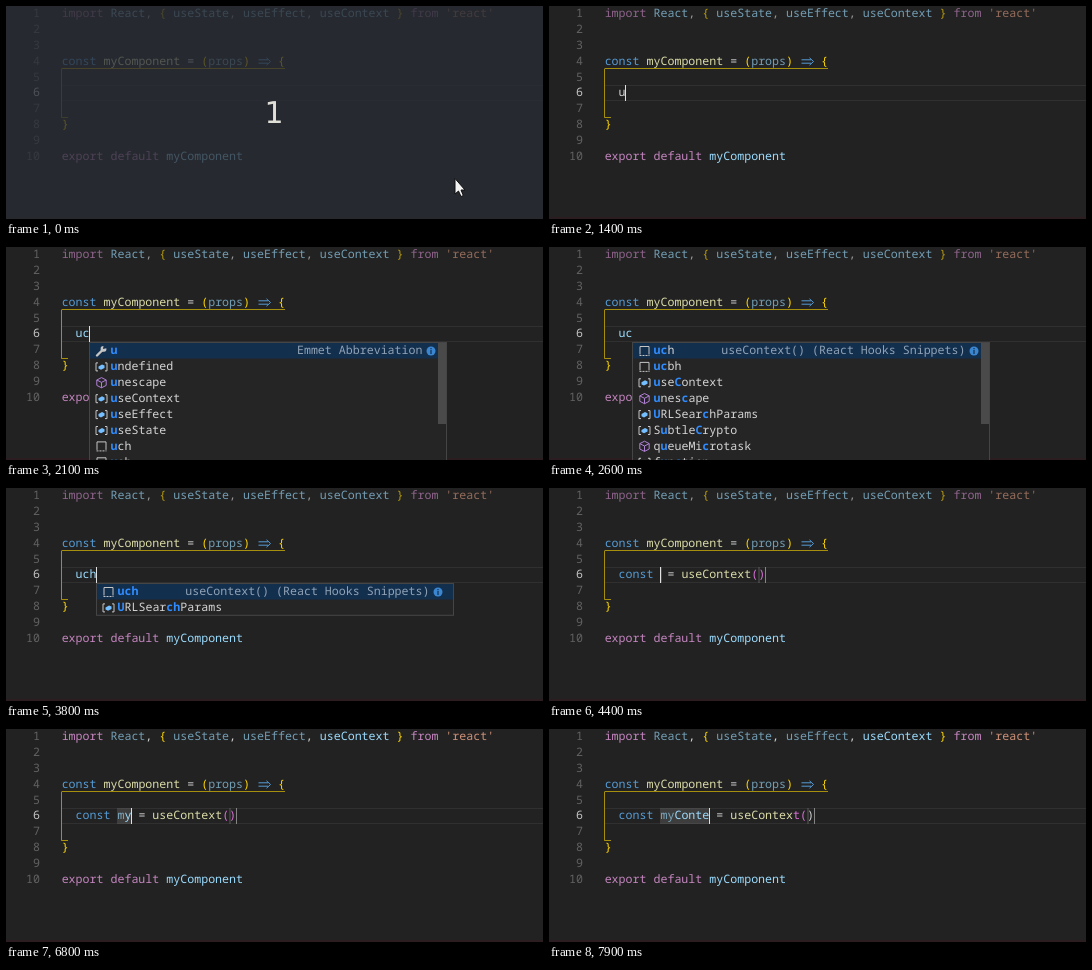
Write an HTML page that moves like this. It is 537 by 213 pixels and loops after 8 s.

```html
<!DOCTYPE html>
<html lang="en">
<head>
<meta charset="utf-8">
<title>Hook snippet</title>
<style>
html, body { margin: 0; width: 100%; height: 100%; overflow: hidden; background: #222; }
svg { display: block; }
text { font: 11.633px "Noto Sans Mono", "DejaVu Sans Mono", monospace; white-space: pre; text-rendering: geometricPrecision; }
.bold { font-weight: 700; }
.count { font: 30px "DejaVu Sans", sans-serif; }
</style>
</head>
<body>
<svg id="stage" width="537" height="213" viewBox="0 0 537 213"></svg>
<script>
const LOOP = 8000, STEP = 100;
const CHAR = 6.98, LEFT = 56.05, PITCH = 15.9, BASE = 10.9;
const C = {
  key: '#c586c0', blue: '#569cd6', name: '#9cdcfe', fn: '#dcdcaa', str: '#ce9178',
  text: '#d4d4d4', gold: '#ffd700', pink: '#da70d6', red: '#f14c4c', match: '#2f8cff'
};
const KEYS = [6200, 6800, 7300, 7500, 7600, 7700, 7900];
const CARET_ON = [[200, 700], [1200, 1900], [2100, 2600], [2800, 3300], [3800, 4700], [5200, 5700], [6200, LOOP]];

// Rows are [icon, label]; matched letters stand between asterisks.
const LIST_U = [
  ['wrench', '*u*'], ['value', '*u*ndefined'], ['cube', '*u*nescape'], ['value', '*u*seContext'],
  ['value', '*u*seEffect'], ['value', '*u*seState'], ['snippet', '*u*ch'], ['snippet', '*u*eh']
];
const LIST_UC = [
  ['snippet', '*uc*h'], ['snippet', '*uc*bh'], ['value', '*u*se*C*ontext'], ['cube', '*u*nes*c*ape'],
  ['value', '*U*RLSear*c*hParams'], ['value', 'S*u*btle*C*rypto'], ['cube', 'q*u*eueMi*c*rotask'], ['value', 'f*u*n*c*tion']
];
const LIST_UCH = [['snippet', '*uch*'], ['value', '*U*RLSear*ch*Params']];
const HOOK = 'useContext() (React Hooks Snippets)';

const ICONS = {
  wrench: '<path d="M1.5 10.5L6 6" stroke="#c5c5c5" stroke-width="2.4" stroke-linecap="round"/>' +
    '<path d="M10.8 3.2A2.9 2.9 0 1 1 8 1L7.5 4Z" fill="#c5c5c5"/>',
  value: '<path d="M2.5 2H.5V10H2.5M9.5 2H11.5V10H9.5" stroke="#c5c5c5" fill="none"/>' +
    '<path d="M3 5.5L6.5 3.5 9 4.7V7L5.5 8.8 3 7.6Z" fill="#75beff"/>',
  cube: '<path d="M6 .8L10.7 3.2V8.6L6 11 1.3 8.6V3.2ZM1.3 3.2L6 5.6 10.7 3.2M6 5.6V11" stroke="#b180d7" fill="none"/>',
  snippet: '<path d="M1.5 9.5V1.5H10.5V9.5" stroke="#c5c5c5" fill="none"/>' +
    '<path d="M1 10.5H11" stroke="#c5c5c5" stroke-dasharray="2 1"/>'
};

const stage = document.getElementById('stage');
const colX = n => LEFT + n * CHAR;
const snapX = n => Math.floor(colX(n));
const baseline = line => BASE + (line - 1) * PITCH;

const esc = s => s.replace(/&/g, '&amp;').replace(/</g, '&lt;');
const span = (color, s, dim) => `<tspan fill="${color}"${dim ? ' fill-opacity=".667"' : ''}>${esc(s)}</tspan>`;
const text = (x, y, body, attrs = '') => `<text x="${x}" y="${y}" ${attrs}>${body}</text>`;
const rect = (x, y, w, h, fill, attrs = '') => `<rect x="${x}" y="${y}" width="${w}" height="${h}" fill="${fill}" ${attrs}/>`;
const code = (line, ...spans) => text(LEFT - .4, baseline(line), spans.join(''));

function gutter() {
  let out = '';
  for (let n = 1; n <= 10; n++)
    out += text(34, baseline(n), n, `text-anchor="end" fill="${n === 6 ? '#c6c6c6' : '#626262'}"`);
  return out;
}

function importLine(used) {
  const dim = !used;
  return code(1,
    span(C.key, 'import ', dim), span(C.name, 'React', true), span(C.text, ', ', dim),
    span(C.gold, '{ ', dim), span(C.name, 'useState', true), span(C.text, ', ', dim),
    span(C.name, 'useEffect', true), span(C.text, ', ', dim), span(C.name, 'useContext', dim),
    span(C.gold, ' }', dim), span(C.key, ' from ', dim), span(C.str, "'react'", dim));
}

function frameCode(t) {
  const guide = t < 1400 ? .45 : .6;
  return rect(56, 79, 481, 1, '#303030') + rect(56, 94, 481, 1, '#303030') +
    rect(0, 211, 537, 2, '#2b1d20') + gutter() + importLine(t >= 6600) +
    code(4, span(C.blue, 'const '), span(C.fn, 'myComponent'), span(C.text, ' = '),
      span(C.gold, '('), span(C.name, 'props', true), span(C.gold, ')'), span(C.text, '    '), span(C.gold, '{')) +
    `<path d="M252.5 53.8H262M252.5 57.2H262M260.5 51.8L264.5 55.5 260.5 59.2" fill="none" stroke="${C.blue}"/>` +
    `<path d="M279 62.5H55.5" fill="none" stroke="${C.gold}" stroke-opacity=".6"/>` +
    `<path d="M55.5 63V111.5H62" fill="none" stroke="${C.gold}" stroke-opacity="${guide}"/>` +
    code(8, span(C.gold, '}')) +
    code(10, span(C.key, 'export default '), span(C.name, 'myComponent'));
}

function squiggle(from, to) {
  let d = `M${colX(from)} 95`;
  for (let x = 0, up = true; x < (to - from) * CHAR - 1; x += 2, up = !up) d += `l2 ${up ? -2 : 2}`;
  return `<path d="${d}" fill="none" stroke="${C.red}"/>`;
}

function typedLine(t) {
  const word = t < 1400 ? '' : t < 2100 ? 'u' : t < 2800 ? 'uc' : 'uch';
  return { col: 2 + word.length, svg: code(6, span(t < 1600 ? C.text : C.name, '  ' + word)) };
}

function snippetLine(t) {
  const count = KEYS.filter(k => k <= t).length;
  const name = 'myConte'.slice(0, count);
  const faded = t >= 7100 ? 2 : t >= 6600 ? 1 : 0;
  const fresh = t < 4400;
  const lag = t >= 7500 ? 1 : 0;
  const call = 'useContext()', cut = 10 - lag;
  const end = 23 + count;
  const mark = 'rgba(124,124,124,.3)';
  let svg = rect(snapX(8), 79, Math.max(2, count * CHAR), 16, count ? mark : '#484848') +
    rect(snapX(end - 1), 79, 2, 16, mark) + rect(snapX(end), 79, 1, 16, '#858585');
  svg += code(6,
    span(fresh ? C.name : C.blue, '  const '),
    span(C.name, name.slice(0, faded), true),
    span(t < 6300 ? C.text : C.name, name.slice(faded)),
    span(C.text, ' = '),
    span(fresh ? C.name : C.fn, call.slice(0, cut)),
    span(fresh ? C.text : C.pink, call.slice(cut, 12 - lag)),
    span(C.text, call.slice(12 - lag)));
  if (t >= 4600 && t < 6600)
    svg += squiggle(9 + count, 10 + count) + squiggle(end - 2, end);
  return { col: 8 + count, svg };
}

function popup(col, rows, detail) {
  const x = snapX(col), y = 95.5, w = 358;
  const h = Math.min(rows.length * PITCH, 190);
  let out = rect(x + .5, y, w - 1, h, '#252526', 'stroke="#454545"') +
    rect(x + 1, 96, w - 2, 15.5, '#132f4e');
  rows.forEach(([icon, label], i) => {
    const top = 96 + i * PITCH;
    const body = label.split('*').map((s, k) => k % 2
      ? `<tspan class="bold" fill="${C.match}">${s}</tspan>` : span(C.text, s)).join('');
    out += `<g transform="translate(${x + 6.5} ${top + 2})">${ICONS[icon]}</g>` + text(x + 21.5, top + 11.3, body);
  });
  if (detail) {
    out += text(x + 333.5, 107.3, esc(detail), 'text-anchor="end" fill="#91a3b6"') +
      `<circle cx="${x + 342}" cy="104" r="4.5" fill="#3a86d0"/>` +
      `<path d="M${x + 342} 103V107M${x + 342} 101V102.2" stroke="#132f4e" stroke-width="1.2"/>`;
  }
  if (rows.length > 2) out += rect(x + 349, 96, 8, 81, '#4a4a4a');
  return out;
}

function suggestions(t, col) {
  if (t < 1600 || t >= 4200) return '';
  if (t < 2300) return popup(col, LIST_U, t >= 1700 && 'Emmet Abbreviation');
  return popup(col, t < 2800 ? LIST_UC : LIST_UCH, HOOK);
}

function countdown(t) {
  const level = Math.max(0, 1 - (t < 200 ? 0 : (t - 100) / 400));
  if (!level) return '';
  let out = rect(0, 0, 537, 213, '#282c34', `opacity="${.76 * level}"`) +
    text(268, 117, '1', `class="count" text-anchor="middle" fill="#e0e0d8" opacity="${level}"`);
  if (t < 200)
    out += '<path d="M449 172.5V188L452.5 185 455 190.5 457.3 189.5 455 184H459Z" fill="#f4f4f4" stroke="#111"/>';
  return out;
}

function render(t) {
  const line = t < 4200 ? typedLine(t) : snippetLine(t);
  const caret = CARET_ON.some(([a, b]) => t >= a && t < b) ? rect(snapX(line.col), 79, 1, 16, '#e0e0e0') : '';
  stage.innerHTML = rect(0, 0, 537, 213, '#222') + frameCode(t) + line.svg +
    suggestions(t, line.col) + caret + countdown(t);
}

const start = performance.now();
let shown = -1;
function tick() {
  const t = Math.floor((performance.now() - start) % LOOP / STEP) * STEP;
  if (t !== shown) render(shown = t);
  requestAnimationFrame(tick);
}
tick();
</script>
</body>
</html>
```
